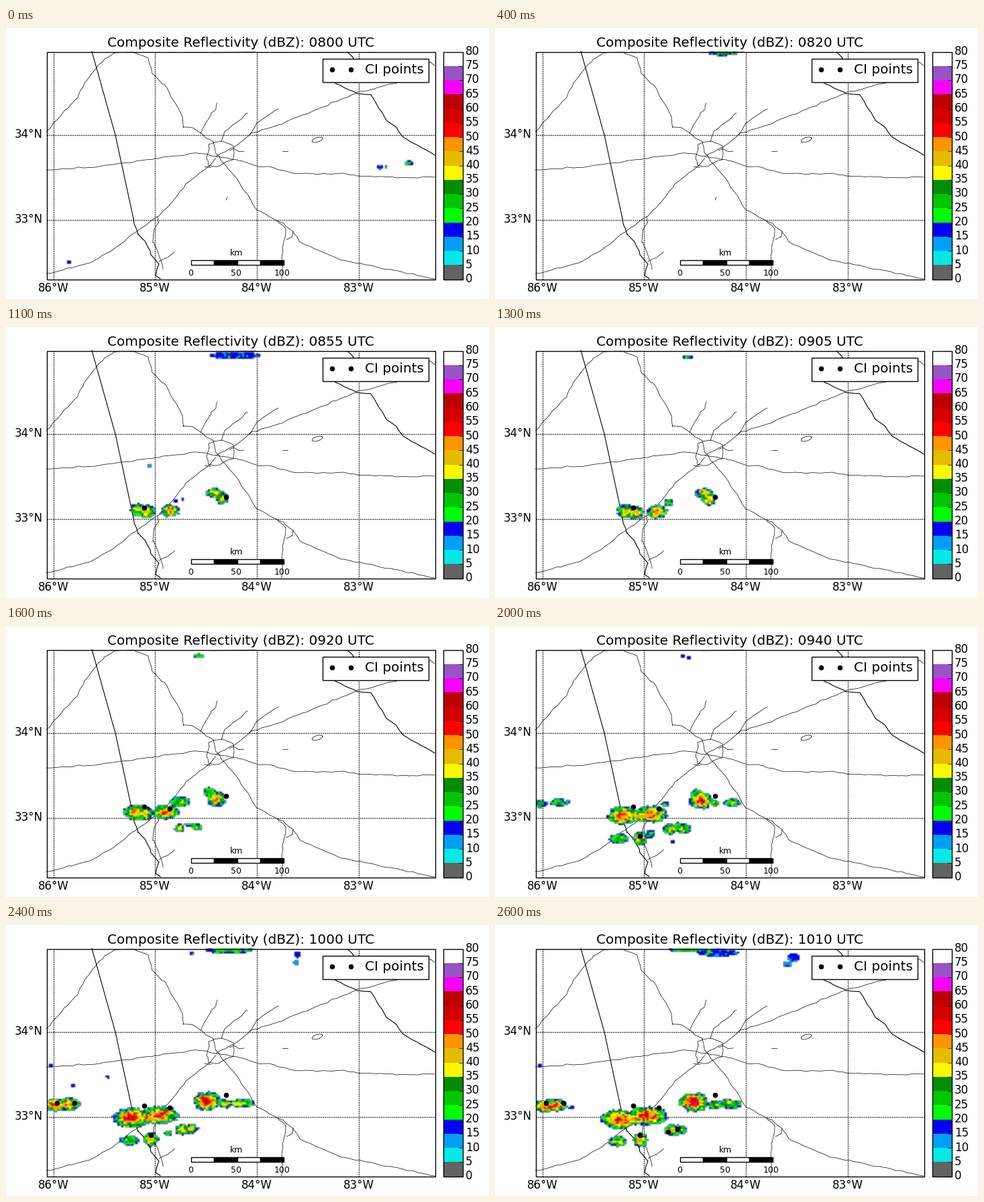
A matplotlib script that plays this animation: 720 px wide and 405 px high, repeating every 2.7 s.

```python
import matplotlib.pyplot as plt
import numpy as np
from matplotlib.animation import FuncAnimation
from matplotlib.colors import to_rgba_array
from matplotlib.patches import Rectangle

W, H, DPI = 720, 405, 100
FRAMES, STEP = 27, 100
LEFT, TOP, RIGHT, BOTTOM = 60.5, 35.5, 639.5, 375.5
COLS, ROWS = 193, 136

LEVELS = ["#636363", "#04e9e7", "#019ff4", "#0300f4", "#02fd02", "#01c501",
          "#008e00", "#fdf802", "#e5bc00", "#fd9500", "#fd0000", "#d40000",
          "#bc0000", "#f800fd", "#9854c6", "#ffffff"]
RGBA = to_rgba_array(LEVELS)

plt.rcParams["font.family"] = "DejaVu Sans"
fig = plt.figure(figsize=(W / DPI, H / DPI), dpi=DPI, facecolor="white")
ax = fig.add_axes([0, 0, 1, 1])
rng = np.random.default_rng(7)


def label(x, y, s, size=12, ha="center", va="center"):
    return ax.text(x, y, s, fontsize=size, ha=ha, va=va, zorder=8)


def box(x0, y0, x1, y1, fill="none", edge="black", z=4, lw=1.0):
    ax.add_patch(Rectangle((x0, y0), x1 - x0, y1 - y0, facecolor=fill,
                           edgecolor=edge, lw=lw, zorder=z))


def path(*xy, lw=0.5, rough=0.6):
    """Polyline through the points, with a slight wander in between."""
    x, y = np.array(xy[::2], float), np.array(xy[1::2], float)
    dist = np.r_[0, np.cumsum(np.hypot(np.diff(x), np.diff(y)))]
    s = np.union1d(dist, np.arange(0, dist[-1], 8))
    wander = rng.normal(0, rough, (2, len(s))) * ~np.isin(s, dist)
    ax.plot(np.interp(s, dist, x) + wander[0], np.interp(s, dist, y) + wander[1],
            color="black", lw=lw, zorder=1)


def draw_borders():
    path(128, 35, 163, 160, 190, 285, lw=0.8, rough=0)
    path(190, 285, 197, 308, 208, 320, 216, 339, 228, 353, 223, 370, 230, 375, lw=0.8)
    path(509, 36, 518, 45, 487, 80, 494, 84, 523, 98, 544, 100, 567, 138,
         580, 147, 592, 163, 639, 190, lw=0.8, rough=0.4)
    path(308, 36.6, 371, 36.2, lw=0.8, rough=0)


def draw_roads():
    path(60, 155, 75, 138, 107, 104, 117, 82, 147, 46, 162, 37, 190, 36,
         212, 45, 218, 68, 236, 84, 263, 132, 264, 148, 278, 149, 309, 170)
    path(309, 170, 312, 184, 322, 200, 348, 231, 374, 272, 404, 288, 417, 300,
         413, 325, 411, 375)
    path(313, 192, 340, 178, 369, 156, 403, 146, 452, 127, 523, 97, 583, 82,
         603, 72, 633, 51, 639, 56)
    path(60, 212, 117, 209, 165, 203, 222, 195, 285, 187, 345, 197, 376, 207,
         392, 207, 424, 216, 470, 218, 507, 218, 523, 221, 600, 224, 639, 223)
    path(60, 367, 125, 351, 160, 331, 196, 303, 226, 282, 248, 260, 270, 232,
         303, 207, 313, 195)
    path(226, 282, 228, 290, 220, 303, 220, 320, 231, 348, 234, 361)
    path(228, 349, 241, 343, 251, 334)
    path(404, 288, 413, 291, 428, 304, 440, 321, 500, 347, 575, 361, 639, 375)
    path(428, 304, 426, 312, 418, 316)
    path(290, 158, 306, 127, 313, 121, 315, 112)
    path(321, 170, 326, 155, 360, 127)
    path(362, 161, 374, 142, 406, 121)
    path(303, 180, 302, 174, 322, 169, 339, 176, 340, 188, 338, 197, 314, 207,
         302, 206, 299, 195, 303, 180)
    path(296, 207, 306, 208)
    path(333, 183, 341, 181, 346, 184, 355, 184)
    path(412, 184, 420, 184)
    path(328, 257, 330, 253)
    a = np.linspace(0, 2 * np.pi, 12)
    ax.plot(464 + 8 * np.cos(a), 167 - 2 * np.cos(a) + 3.5 * np.sin(a),
            color="black", lw=0.5, zorder=1)


def draw_chart():
    for i in range(4):
        x = 70.5 + 151.7 * i
        ax.plot([x, x], [BOTTOM, TOP], color="black", lw=1, dashes=[1, 1], zorder=2)
        label(x, 389, f"{86 - i}°W")
    for y, name in ((159.5, 34), (286.5, 33)):
        ax.plot([LEFT, RIGHT], [y, y], color="black", lw=1, dashes=[1, 1], zorder=2)
        label(55, y - 0.5, f"{name}°N", ha="right")
    box(LEFT, TOP, RIGHT, BOTTOM)


def draw_colorbar():
    x0, x1 = 651.5, 680.5
    step = (BOTTOM - TOP) / len(LEVELS)
    for i, color in enumerate(LEVELS):
        y = BOTTOM - i * step
        box(x0, y - step, x1, y, fill=color, edge="none", z=3, lw=0)
    for i in range(len(LEVELS) + 1):
        y = BOTTOM - i * step
        ax.plot([x1 - 5.5, x1], [y, y], color="black", lw=0.5, zorder=4)
        label(685, y - 0.5, str(5 * i), ha="left")
    box(x0, TOP, x1, BOTTOM)


def draw_scale():
    edges = np.linspace(275.5, 413.5, 5)
    for i in range(4):
        box(edges[i], 346.5, edges[i + 1], 353.5,
            fill="black" if i % 2 else "white", z=6)
    for i in range(3):
        label(275.5 + 68 * i, 366.5, str(50 * i), 9)
    label(343.5, 336.5, "km", 9)


def draw_legend():
    box(471.5, 45.5, 629.5, 80.5, fill="white", z=6)
    ax.plot([485.5, 513.5], [61.8, 61.8], "o", color="black", ms=5, mew=0.5, zorder=7)
    label(535, 68.3, "CI points", 14.4, "left", "baseline")


cells = []


def cell(first, last, x, y, rx=2.4, ry=2.4, peak=17, dx=0, dy=0, grow=1):
    """Echo that drifts by (dx, dy) over its life and grows for some steps."""
    cells.append((first, last, x, y, rx, ry, peak, dx, dy, grow))


def add_specks():
    cell(0, 1, 599, 202, 4, 3, 28)
    cell(0, 1, 603, 202, 3, 3, 19)
    cell(0, 1, 557, 208.5, 5.5, 3, 15)
    cell(0, 0, 566, 208, peak=28)
    cell(0, 0, 93.5, 350)
    cell(7, 7, 316.5, 246.5)
    cell(7, 11, 253, 266, dy=-6)
    cell(11, 11, 263, 258)
    cell(10, 11, 213, 208, 3, 3, 13)
    cell(20, 20, 279, 46)
    cell(20, 20, 288, 48.5)
    cell(20, 20, 265, 323)
    cell(23, 26, 67, 211, 3.5)
    cell(24, 24, 151.5, 227)
    cell(24, 24, 99, 240)
    cell(24, 24, 277, 43.5, peak=24)
    cell(26, 26, 114, 274, 4)


def add_north():
    cell(3, 8, 339, 38, 32, 5, 34, 0, 1, 4)
    cell(6, 8, 323, 43, 9, 5, 28)
    cell(6, 8, 354, 43, 12, 5, 27)
    cell(9, 12, 340, 43, 34, 5, 18)
    cell(13, 18, 287, 45, 8, 3, 28)
    cell(22, 25, 330, 36, 31, 5, 27, 2, 3, 3)
    cell(26, 26, 331, 42, 28, 5, 18)
    cell(25, 26, 288, 37, 26, 4, 27)
    cell(24, 25, 434, 45, 4, 4)
    cell(24, 25, 432, 57, 4, 3, 14)
    cell(26, 26, 445, 49, 8, 6)
    cell(26, 26, 435, 59, 6, 4, 14)


def add_storms():
    # centre
    cell(5, 26, 250, 271, 28, 13, 55, -23, 15, 22)
    cell(13, 18, 259, 263, 13, 7.5, 31, grow=3)
    cell(19, 21, 253, 267, 5, 4, 22)
    cell(14, 26, 228, 278, 13, 9, 48, -20, 13, 10)
    # west
    cell(8, 26, 199, 270, 26, 14, 53, -14, 21, 17)
    cell(9, 22, 211, 275, 12, 9, 44, -8, 10, 3)
    # east
    cell(5, 7, 329.5, 254, 4, 3, 28)
    cell(8, 26, 327, 255, 21, 14, 56, -31, 10, 19)
    cell(8, 13, 311, 249, 12, 7, 42, grow=3)
    cell(14, 23, 305, 248, 9, 7, 31, -7, 6)
    cell(18, 26, 328, 264, 9, 6.5, 42, -2, 5, 6)
    cell(18, 26, 354, 263, 17, 6.5, 37, -4, 5, 5)
    # left edge
    cell(18, 21, 66, 265, 10, 5, 28, 2, 2)
    cell(18, 21, 96, 264, 14, 5, 29)
    cell(22, 26, 72, 268, 17, 9, 51, 4, 3, 3)
    cell(22, 26, 95, 267, 16, 9, 49, -5, 3, 2)
    # south
    cell(14, 26, 257, 301, 11, 7.5, 42, 7, 6, 6)
    cell(14, 26, 286, 300, 12, 7, 36, -13, 7, 6)
    cell(16, 20, 272, 297, 6, 2.6, 24)
    cell(17, 26, 185, 316, 13, 7, 36, -2, 8, 4)
    cell(17, 26, 217, 316, 10, 10, 44, -1, 6, 4)
    cell(19, 21, 231, 311, 6, 6, 27)
    cell(22, 24, 241, 312, 5, 4, 28)


# Initiation points: first step shown, x, y
POINTS = np.array([(10, 205.5, 269.5), (10, 327.5, 253.5), (14, 243.5, 272.5),
                   (19, 215.5, 313.5), (23, 75.5, 265.5), (23, 101.5, 265.5),
                   (25, 257.5, 308.5), (26, 271.5, 304.5)])

gx, gy = np.meshgrid(LEFT + (np.arange(COLS) + 0.5) * (RIGHT - LEFT) / COLS,
                     TOP + (np.arange(ROWS) + 0.5) * (BOTTOM - TOP) / ROWS)


def noise(frame):
    raw = np.random.default_rng(40 + frame).normal(size=(ROWS, COLS))
    return (raw + np.roll(raw, 1, 0) + np.roll(raw, 1, 1)) / np.sqrt(3)


def radar(frame):
    grain = noise(frame)
    field = np.zeros((ROWS, COLS))
    for first, last, x, y, rx, ry, peak, dx, dy, grow in cells:
        if not first <= frame <= last:
            continue
        t = (frame - first) / max(last - first, 1)
        g = min((frame - first + 1) / grow, 1)
        rx *= 0.25 + 0.75 * g
        ry *= 0.25 + 0.75 * g ** 0.5
        peak += (min(peak, 20) - peak) * (1 - g ** 0.35)
        d2 = ((gx - x - dx * t) / rx) ** 2 + ((gy - y - dy * t) / ry) ** 2
        value = peak - max(peak - 16, 0) * d2 + grain * peak / (9 if rx > 5 else 24)
        value[(d2 > 1.25) | (value < 11)] = 0
        field = np.maximum(field, value)
    image = RGBA[np.clip(field // 5, 0, len(LEVELS) - 1).astype(int)]
    image[field <= 0] = 0
    return image


draw_borders()
draw_roads()
draw_chart()
draw_colorbar()
draw_scale()
draw_legend()
add_specks()
add_north()
add_storms()
title = label(350, 28.3, "", 14.4, va="baseline")
echo = ax.imshow(radar(0), extent=(LEFT, RIGHT, BOTTOM, TOP), aspect="auto",
                 interpolation="bilinear", zorder=3)
dots, = ax.plot([], [], "o", color="black", ms=5, mew=0.5, zorder=5)
ax.set(xlim=(0, W), ylim=(H, 0))
ax.axis("off")


def update(frame):
    hour, minute = divmod(480 + 5 * frame, 60)
    title.set_text(f"Composite Reflectivity (dBZ): {hour:02d}{minute:02d} UTC")
    echo.set_data(radar(frame))
    seen = POINTS[POINTS[:, 0] <= frame]
    dots.set_data(seen[:, 1], seen[:, 2])
    return title, echo, dots


anim = FuncAnimation(fig, update, frames=FRAMES, interval=STEP,
                     init_func=lambda: update(0), repeat=True, repeat_delay=0)
plt.show()
```
